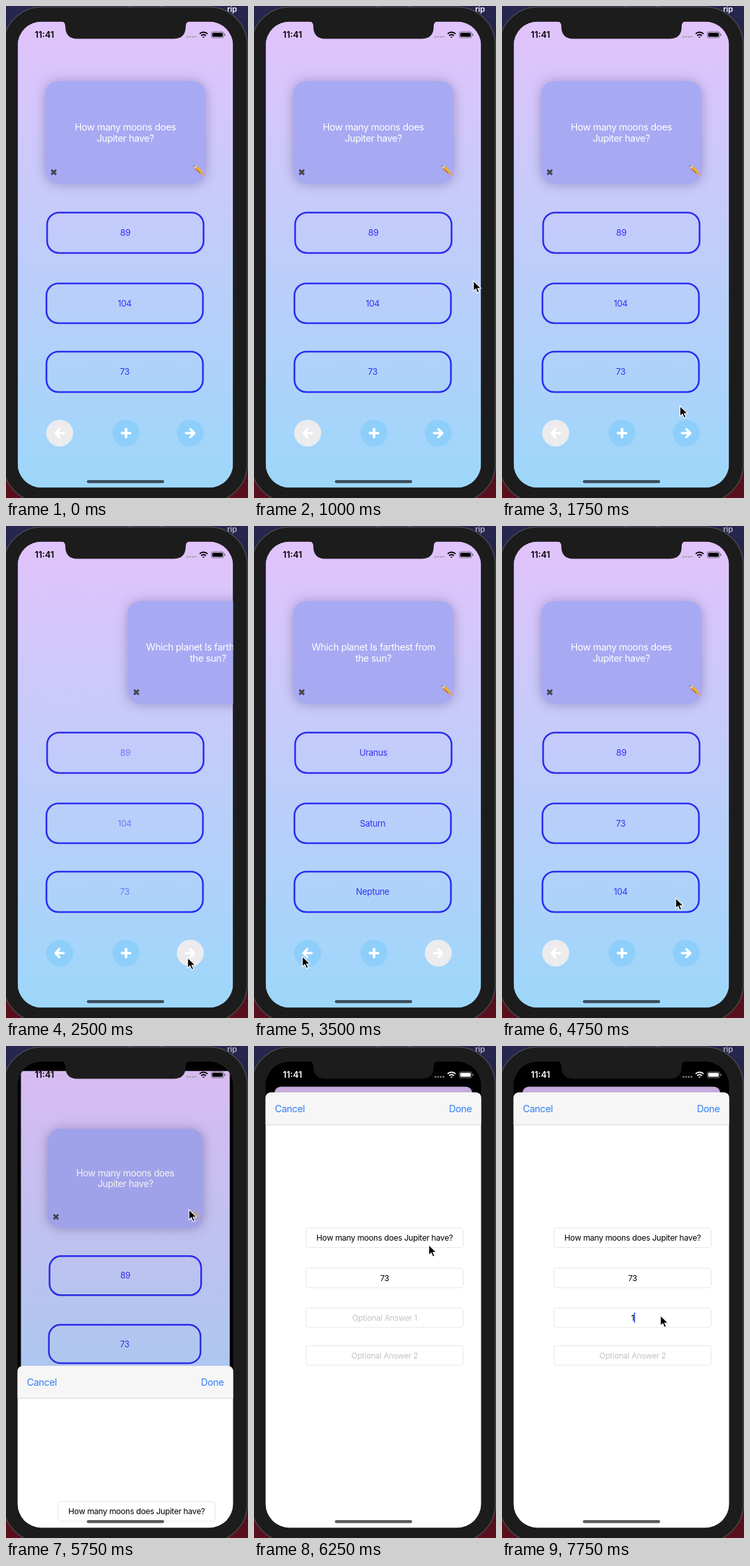
Write an HTML page that moves like this. It is 365x743 px and loops after 8000 ms.

```html
<!DOCTYPE html>
<html lang="en">
<head>
<meta charset="utf-8">
<style>
html, body { margin: 0; width: 100%; height: 100%; overflow: hidden; background: #1c1c1c; }
svg { display: block; width: 100vw; height: 100vh; }
text { font: 14.4px Inter, "Liberation Sans", sans-serif; letter-spacing: -.025em; }
.mid { text-anchor: middle; }
#card text { fill: #fff; }
#card rect { fill: #a7a9f3; filter: drop-shadow(0 1px 9px rgba(40, 30, 90, .32)); }
#answers text { font-size: 13px; fill: #352ff0; }
#answers rect { fill: none; stroke: #2a2bf1; stroke-width: 2.6; }
#fields text { font-size: 12.2px; }
#fields rect { fill: #fff; stroke: #e6e6e6; }
.bar { fill: #2f7df6; }
.arrow { fill: none; stroke: #fff; stroke-width: 3.4; stroke-linecap: round; stroke-linejoin: round; }
</style>
</head>
<body>
<svg viewBox="0 0 365 743" preserveAspectRatio="none">
  <defs>
    <linearGradient id="desk" x2="0" y2="1">
      <stop stop-color="#26264f"/><stop offset=".5" stop-color="#17151d"/><stop offset="1" stop-color="#5a101c"/>
    </linearGradient>
    <linearGradient id="sky" x2="0" y2="1">
      <stop stop-color="#e1c3fb"/><stop offset="1" stop-color="#9dd7fa"/>
    </linearGradient>
    <clipPath id="glass"><rect x="17.5" y="23.5" width="325" height="704" rx="36"/></clipPath>
  </defs>

  <rect width="365" height="743" fill="url(#desk)"/>
  <text id="tab" x="333.5" y="9" style="font-size:12px;font-weight:600">rip</text>
  <path d="M185 0h4M233 0h5" stroke="#8d8498"/>
  <rect x="-4" y="1.5" width="368" height="748" rx="58" fill="#1c1c1c" stroke="#4b4b50" stroke-width="1.4"/>

  <g clip-path="url(#glass)">
    <rect x="17" y="23" width="326" height="705"/>
    <g id="view">
      <rect class="panel" x="17.5" y="23.5" width="325" height="704" fill="url(#sky)"/>
      <g id="card">
        <rect x="59" y="113.5" width="242" height="154.5" rx="20"/>
        <text class="mid" x="180" y="187.5"></text>
        <text class="mid" x="180" y="204.5"></text>
        <path d="M68.4 247.4l7.2 7.2m0-7.2l-7.2 7.2" stroke="#45454b" stroke-width="3"/>
        <g id="pencil" transform="translate(283 240.5) rotate(43)">
          <path d="M0 0l5-2.7v5.4z" fill="#e8cfa6"/>
          <path d="M0 0l2-1.1v2.2z" fill="#444"/>
          <path d="M5-2.7h11v5.4h-11z" fill="#f0ae3c"/>
          <path d="M5 1h11v1.7h-11z" fill="#b9782a"/>
          <path d="M16-2.7h2v5.4h-2z" fill="#a9adb5"/>
          <path d="M18-2.7h2q2 0 2 2.7t-2 2.7h-2z" fill="#e59a9c"/>
        </g>
      </g>
      <g id="answers"></g>
      <circle id="prev" cx="81" cy="645" r="20.3"/>
      <path class="arrow" d="M87 645h-12m5.5-6l-6 6 6 6"/>
      <circle cx="181" cy="645" r="20.3" fill="#8dcffa"/>
      <path class="arrow" style="stroke-width:4" d="M175 645h12m-6-6v12"/>
      <circle id="next" cx="278" cy="645" r="20.3"/>
      <path class="arrow" d="M271.5 645h12m-5.5-6l6 6-6 6"/>
      <rect id="dim" class="panel" x="17.5" y="23.5" width="325" height="704"/>
    </g>

    <g id="status">
      <text class="mid" x="58" y="48" style="font-size:13px;font-weight:600;letter-spacing:0">11:41</text>
      <path d="M273.7 46.5h13" fill="none" stroke="#999" stroke-opacity=".75" stroke-width="3" stroke-linecap="round" stroke-dasharray="0 4"/>
      <g fill="none" stroke="currentColor" stroke-width="2">
        <path d="M292 42q6-5 12 0M294.4 44.7q3.6-3 7.2 0"/>
        <path d="M296.2 46.2h3.6l-1.8 2z" fill="currentColor" stroke="none"/>
        <rect x="309.5" y="39" width="19" height="9" rx="2.6" stroke-width="1" stroke-opacity=".45"/>
        <path d="M330.2 42v3" stroke-width="1.3" stroke-opacity=".5"/>
        <rect x="311" y="40.5" width="16" height="6" rx="1.4" fill="currentColor" stroke="none"/>
      </g>
    </g>

    <g id="sheet">
      <path d="M17 700V10q0-10 10-10h306q10 0 10 10v690z" fill="#fff"/>
      <path d="M17 49V10q0-10 10-10h306q10 0 10 10v39z" fill="#f6f6f6"/>
      <path d="M17 49h326" stroke="#d2d2d4"/>
      <text class="bar" x="31.5" y="30">Cancel</text>
      <text class="bar" x="328.5" y="30" text-anchor="end">Done</text>
      <g id="fields"></g>
      <path id="caret" stroke="#3656d6" stroke-width="1.6"/>
    </g>
  </g>

  <path d="M82 22.5q7.5 1 7.5 8 0 19 18 19h145.500q18 0 18-19 0-7 7.500-8z" fill="#1c1c1c"/>
  <rect x="122" y="716" width="116.500" height="4.500" rx="2.250" fill="#000" opacity=".64"/>
  <path id="mouse" d="M0 0v15.500l3.600-3.300 2.500 5.700 2.700-1.200-2.500-5.500h5z" fill="#000" stroke="#fff" stroke-width="1.100"/>
</svg>

<script>
const $ = id => document.getElementById(id);
const set = (id, name, value) => $(id).setAttribute(name, value);
const ease = u => (u = Math.min(1, Math.max(0, u)), u * u * (3 - 2 * u));

const moons = ['How many moons does', 'Jupiter have?'];
const planet = ['Which planet Is farthest from', 'the sun?'];
const turns = [2033, 3543];   // taps on next and previous
const path = [[750, 352, 330], [1250, 310, 500], [1750, 268.5, 604], [2000, 274, 652],
  [2750, 274, 652], [3000, 110, 655], [3250, 110, 655], [3500, 73, 650], [4250, 73, 650],
  [4500, 160, 628], [4750, 262, 562], [5000, 274, 400], [5250, 276, 265], [5500, 276, 247],
  [6000, 276, 247], [6750, 239, 407]];

$('answers').innerHTML = [[62, 312, 61], [61, 419, 60], [61, 522, 61]].map(([x, y, h]) =>
  `<rect x="${x}" y="${y}" width="236" height="${h}" rx="18"/>
   <text class="mid" x="${x + 118}" y="${y + 35.3}"></text>`).join('');

$('fields').innerHTML = [[205, moons.join(' ')], [265.5, '73'], [325.5, ''], [382.5, 'Optional Answer 2']].map(([y, s]) =>
  `<rect x="78.5" y="${y}" width="237" height="29.5" rx="4"/>
   <text class="mid" x="197" y="${y + 19.4}" fill="${s[0] == 'O' ? '#c4c4c7' : '#000'}">${s}</text>`).join('');

const lines = $('card').querySelectorAll('text');
const titles = $('answers').querySelectorAll('text');
const entry = $('fields').querySelectorAll('text')[2];
const write = (nodes, words) => nodes.forEach((n, i) => n.textContent = words[i]);

function pointer(t) {
  set('mouse', 'visibility', t < 750 ? 'hidden' : 'visible');
  const i = path.findIndex(p => p[0] >= t);
  const b = path[i < 0 ? path.length - 1 : i], a = path[i - 1] || b;
  const u = b == a ? 0 : Math.min(1, (t - a[0]) / (b[0] - a[0]));
  const at = k => a[k] + (b[k] - a[k]) * u;
  const [x, y] = i < 0 ? b.slice(1) : [at(1), at(2)];
  set('mouse', 'transform', `translate(${x} ${y})`);
}

function cards(t) {
  const start = t < turns[1] ? turns[0] : turns[1];
  const dt = t - start;
  const x = dt < 300 ? -300 * ease(dt / 300) : 300 * (1 - ease(dt / 300 - 1));
  set('card', 'transform', `translate(${x})`);
  const second = t >= turns[0] + 300 && t < turns[1] + 300;
  write(lines, second ? planet : moons);

  const swap = 600;
  write(titles, t < turns[0] + swap ? ['89', '104', '73']
    : t < turns[1] + swap ? ['Uranus', 'Saturn', 'Neptune'] : ['89', '73', '104']);
  titles.forEach(n => n.setAttribute('opacity', dt >= 300 && dt < swap ? .55 : 1));

  const last = t >= turns[0] && t < turns[1];
  set('next', 'fill', last ? '#ececee' : '#8dcffa');
  set('prev', 'fill', last ? '#8dcffa' : '#ececee');
}

function form(t) {
  const p = ease((t - 5543) / 500);
  set('view', 'transform', `translate(180 ${24 + 38 * p}) scale(${1 - .083 * p}) translate(-180 -24)`);
  document.querySelectorAll('.panel').forEach(n => n.setAttribute('rx', 10 * p));
  set('dim', 'opacity', .12 * p);
  set('sheet', 'transform', `translate(0 ${728 - 658 * p})`);
  set('pencil', 'opacity', t >= 5500 ? .45 : 1);
  const ink = p > .5 ? '#fff' : '#000';
  set('status', 'fill', ink);
  set('status', 'color', ink);

  const typed = t >= 7750;
  entry.textContent = typed ? '1' : 'Optional Answer 1';
  entry.setAttribute('fill', typed ? '#000' : '#c4c4c7');
  set('caret', 'd', `M${typed ? 199.8 : 197} 332.500v15.500`);
  set('caret', 'visibility', t >= 7500 ? 'visible' : 'hidden');
}

function draw(now) {
  const t = Math.floor(now % 8000 / 250) * 250;
  set('tab', 'fill', t < 2000 ? '#f4f2f8' : '#b3aebb');
  pointer(t);
  cards(t);
  form(t);
  requestAnimationFrame(draw);
}
draw(0);
</script>
</body>
</html>
```
